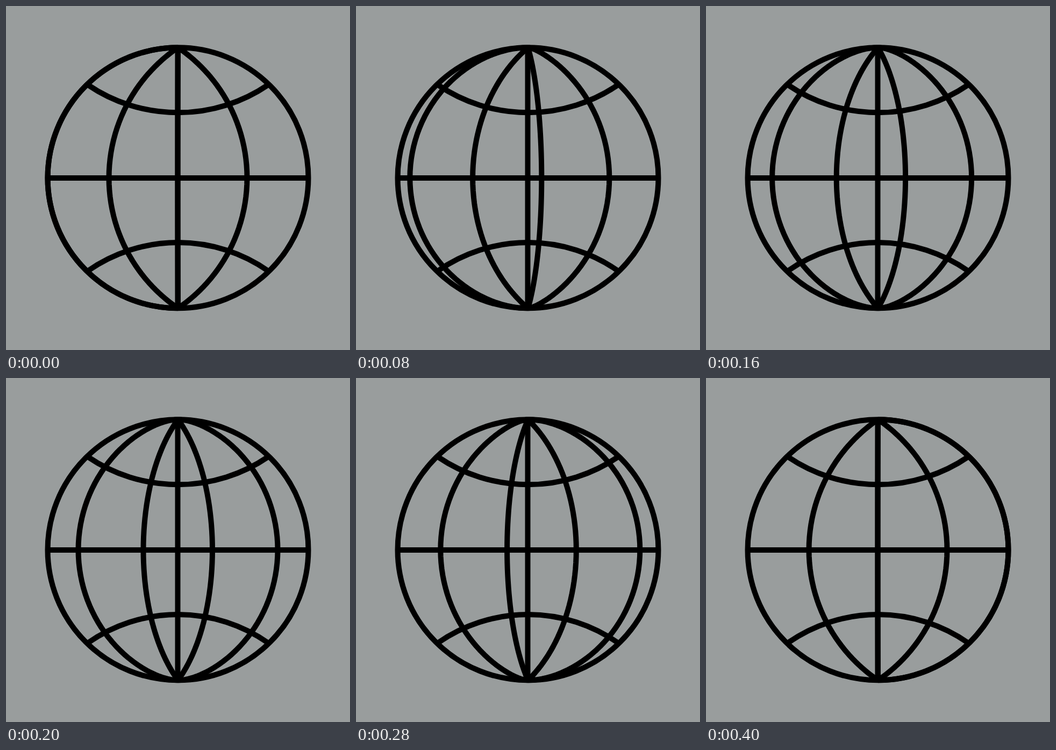
An HTML page for the animation above (0.44 s loop, 640 by 640 pixels).

```html
<!DOCTYPE html>
<html lang="en">
<head>
<meta charset="utf-8">
<title>Spinning globe</title>
<style>
  html, body { margin: 0; width: 100%; height: 100%; overflow: hidden; background: #999d9d; }
  svg { display: block; width: 100%; height: 100%; }
</style>
</head>
<body>
<svg viewBox="0 0 640 640" fill="none" stroke="#000" stroke-width="10">
  <circle cx="320" cy="319.8" r="242.5"/>
  <path d="M77.5 320H562.5M319.5 73V567"/>
  <path d="M152 146.5A298 298 0 0 0 488 146.5M152 493A293 293 0 0 1 488 493"/>
  <path id="meridians" stroke-linejoin="round"/>
</svg>
<script>
  const CX = 320, CY = 319.8, R = 242.5;
  const STEP = 40, SPIN = 400, LOOP = 440, SEGMENTS = 64;

  // Signed bulge of each meridian at the equator, from left to right
  const bulges = [-R, -128.5, -0.5, 128.5, R];
  const meridians = document.getElementById("meridians");

  // Horizontal offset at height y of the circular arc through both poles
  function arcOffset(bulge, y) {
    const size = Math.abs(bulge);
    const radius = (R * R + size * size) / (2 * size);
    const drop = radius - Math.sqrt(Math.max(0, radius * radius - y * y));
    return Math.sign(bulge) * (size - drop);
  }

  function meridian(from, to, p) {
    const points = [];
    for (let i = 0; i <= SEGMENTS; i++) {
      const y = -R * Math.cos(Math.PI * i / SEGMENTS);
      const x = arcOffset(from, y) * (1 - p) + arcOffset(to, y) * p;
      points.push(`${(CX + x).toFixed(2)} ${(CY + y).toFixed(2)}`);
    }
    return "M" + points.join("L");
  }

  function draw(now) {
    const time = Math.floor(now % LOOP / STEP) * STEP;
    const path = bulges.slice(1).map((to, i) => meridian(bulges[i], to, time / SPIN));
    meridians.setAttribute("d", path.join(""));
    requestAnimationFrame(draw);
  }
  draw(0);
</script>
</body>
</html>
```
